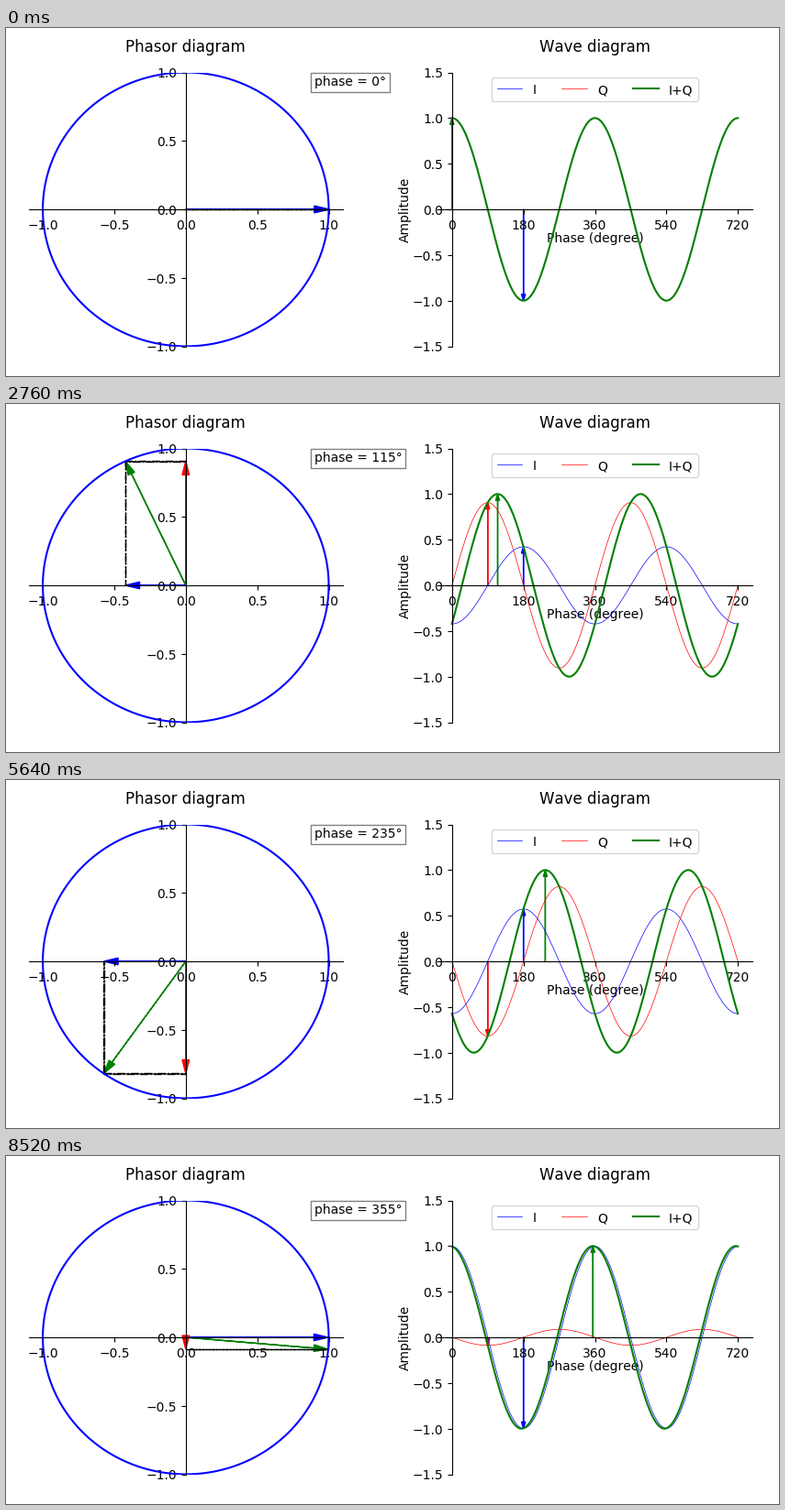
Write a matplotlib script that moves like this. It is 842 px wide and 380 px high and loops after 8640 ms.

```python
import numpy as np
import matplotlib.pyplot as plt
from matplotlib.animation import FuncAnimation
from matplotlib.transforms import ScaledTranslation

WIDTH, HEIGHT, DPI = 842, 380, 100
STEP, FRAMES, INTERVAL = 5, 72, 120

plt.rcParams["font.family"] = "DejaVu Sans"
plt.rcParams["text.kerning_factor"] = 6
fig = plt.figure(figsize=(WIDTH / DPI, HEIGHT / DPI), dpi=DPI, facecolor="white")


def lower(texts, pixels):
    shift = ScaledTranslation(0, -pixels / DPI, fig.dpi_scale_trans)
    for text in texts:
        text.set_transform(text.get_transform() + shift)


def make_axes(left, title, xlim, ylim, xticks, yticks):
    top, bottom, width = 48.5, 347.53, 342.6
    ax = fig.add_axes([left / WIDTH, 1 - bottom / HEIGHT,
                       width / WIDTH, (bottom - top) / HEIGHT])
    for side in ("left", "bottom"):
        ax.spines[side].set_position("zero")
    for side in ("right", "top"):
        ax.spines[side].set_visible(False)
    ax.set(xlim=xlim, ylim=ylim, xticks=xticks, yticks=yticks)
    ax.tick_params(axis="x", pad=4.3)
    lower(ax.get_yticklabels(), 0.4)
    ax.set_title(title, y=1.05, pad=5.3)
    return ax


phasor = make_axes(24.5, "Phasor diagram", (-1.1, 1.1), (-1, 1),
                   np.arange(-1, 1.1, 0.5), np.arange(-1, 1.1, 0.5))
wave = make_axes(470.2, "Wave diagram", (-36, 756), (-1.5, 1.5),
                 np.arange(0, 721, 180), np.arange(-1.5, 1.6, 0.5))
wave.set_xlabel("Phase (degree)", labelpad=0)
wave.set_ylabel("Amplitude", labelpad=0.7)

turn = np.linspace(0, 2 * np.pi, 361)
phasor.plot(np.cos(turn), np.sin(turn), color="blue", lw=1.5)
label = phasor.text(0.9, 0.9, "", bbox=dict(
    boxstyle="square,pad=0.27", facecolor="white", edgecolor="0.5", lw=1))

degrees = np.arange(0, 721, 2)
x = np.radians(degrees)
line_i, = wave.plot(degrees, 0 * x, color="blue", lw=0.5, label="I")
line_q, = wave.plot(degrees, 0 * x, color="red", lw=0.5, label="Q")
line_sum, = wave.plot(degrees, 0 * x, color="green", lw=1.5, label="I+Q")
legend = wave.legend(loc="upper center", ncol=3, borderaxespad=0.43)
lower(legend.get_texts(), 1)

arrows = []


def add_arrow(ax, start, delta, color, head=(0, 0), **style):
    arrows.append(ax.arrow(*start, *delta, head_width=head[0], head_length=head[1],
                           length_includes_head=True, fc=color, ec=color, **style))


def update(frame):
    while arrows:
        arrows.pop().remove()
    phase = frame * STEP
    i, q = np.cos(np.radians(phase)), np.sin(np.radians(phase))
    label.set_text(f"phase = {phase}°")

    line_i.set_ydata(i * np.cos(x))
    line_q.set_ydata(q * np.sin(x))
    line_sum.set_ydata(i * np.cos(x) + q * np.sin(x))

    head = (0.05, 0.1)
    add_arrow(phasor, (0, 0), (i, q), "green", head)
    add_arrow(phasor, (0, 0), (i, 0), "blue", head)
    add_arrow(phasor, (0, 0), (0, q), "red", head)
    add_arrow(phasor, (i, 0), (0, q), "black", ls="-.")
    add_arrow(phasor, (0, q), (i, 0), "black", ls="-.")

    head = (10, 0.07)
    add_arrow(wave, (180, 0), (0, -i), "blue", head)
    add_arrow(wave, (90, 0), (0, q), "red", head)
    add_arrow(wave, (phase, 0), (0, 1), "green", head)
    return [label, line_i, line_q, line_sum, *arrows]


anim = FuncAnimation(fig, update, frames=FRAMES, interval=INTERVAL,
                     init_func=lambda: update(0), repeat=True, blit=False)
plt.show()
```
